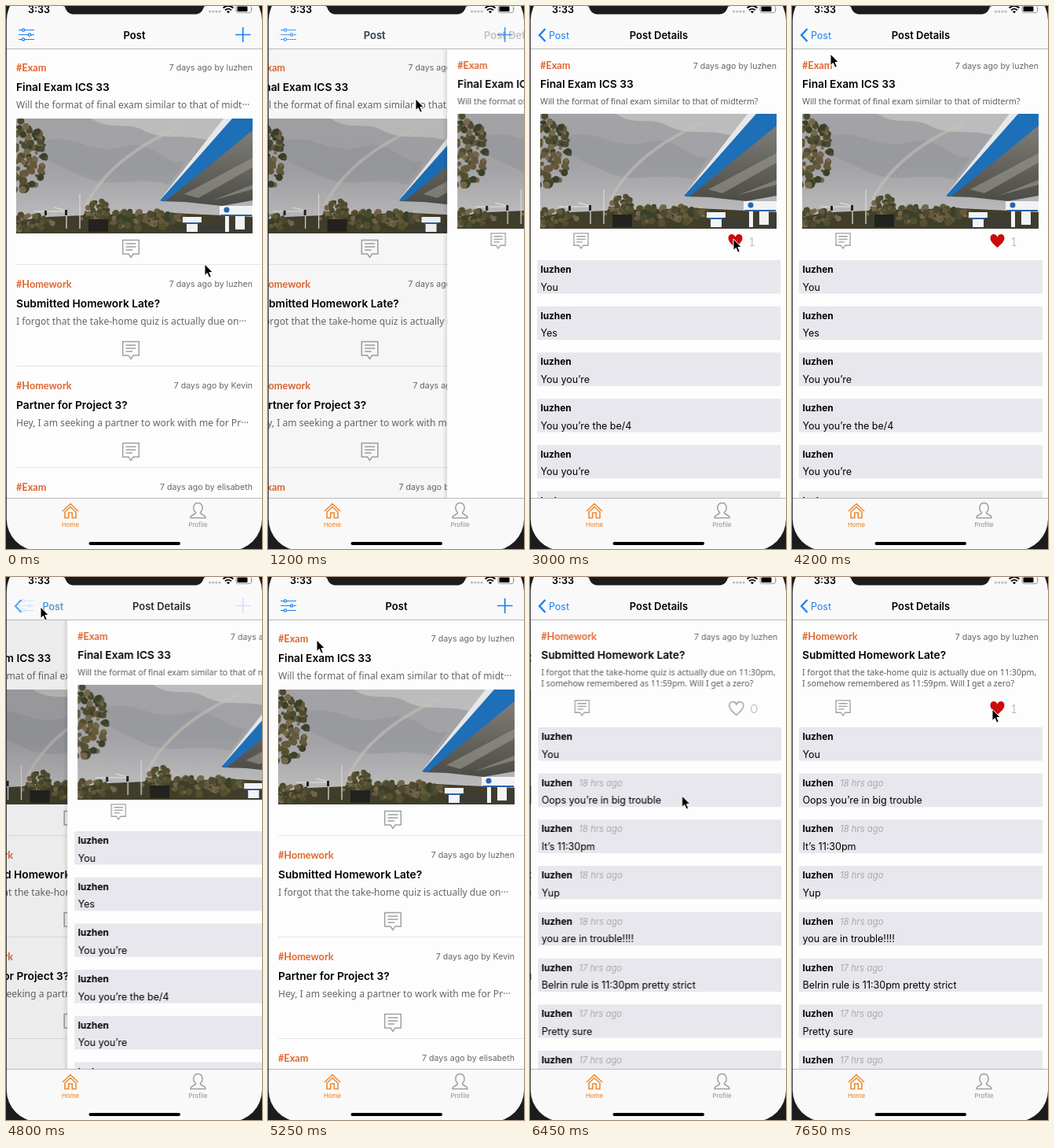
Animation, 326 px wide and 690 px high, one loop 8 s. Source, as an HTML page:

```html
<!DOCTYPE html>
<html lang="en">
<head>
<meta charset="utf-8">
<title>Class forum</title>
<style>
@property --page { syntax: "<number>"; inherits: true; initial-value: 0; }
@property --bar { syntax: "<number>"; inherits: true; initial-value: 0; }
html, body { margin: 0; width: 100%; height: 100%; overflow: hidden; background: #1c1c1c; }
svg { display: block; font-family: Inter, sans-serif; }
#stage { width: 326px; height: 690px; animation: navigate 8s -30ms step-end infinite; }

.tag { font: 700 12.7px Lato, sans-serif; fill: #e0662f; }
.meta { font-size: 10.6px; fill: #666; text-anchor: end; }
.title { font-size: 13.75px; font-weight: 600; }
.excerpt { font: 12.1px "Noto Sans", sans-serif; fill: #666; }
.body { font: 10.64px "Noto Sans", sans-serif; fill: #5c5c5c; }
.name { font-size: 11.8px; font-weight: 700; }
.ago { font-size: 11.3px; font-style: italic; fill: #aaa; }
.reply { font-size: 12.5px; }
.count { font: 300 15.5px Lato, sans-serif; fill: #999; }
.nav { font-size: 13px; font-weight: 600; text-anchor: middle; }
.back { font-size: 12.5px; font-weight: 400; fill: #1c80f5; }
.tab { font-size: 7.8px; font-weight: 500; text-anchor: middle; }
.line { fill: none; stroke: #a0a0a0; stroke-width: 1.5; }
.blue { fill: none; stroke: #1c80f5; stroke-width: 1.2; }

#list { transform: translateX(calc(var(--page) * -98px)); }
#dim { opacity: calc(var(--page) * .09); }
#detail { transform: translateX(calc((1 - var(--page)) * 326px)); }
#shadow { opacity: calc(var(--page) * (1 - var(--page)) * 3); }
#home-title { transform: translateX(calc(var(--bar) * -126.5px)); }
#detail-title { transform: translateX(calc((1 - var(--bar)) * 190px)); opacity: var(--bar); }
.leaving { opacity: calc(1 - var(--bar)); }
.arriving { opacity: var(--bar); }
#chevron { stroke-width: 2.4; opacity: calc(var(--bar) * var(--bar)); }

#exam, #homework, .replies, .liked { animation: 8s -30ms step-end infinite; }
#exam { animation-name: exam; }
#homework { animation-name: homework; }
#exam .replies { animation-name: exam-load; }
#exam .liked { animation-name: exam-like; }
#homework .replies { animation-name: homework-load; }
#homework .liked { animation-name: homework-like; }
#cursor { animation: point 8s -30ms infinite; }

@keyframes navigate {
  0% { --page: 0; --bar: 0; }
  15% { --page: .3; --bar: .22; }
  16.875% { --page: .896; --bar: .8; }
  18.75% { --page: .989; --bar: .98; }
  20.625% { --page: .9985; --bar: 1; }
  22.5% { --page: 1; --bar: 1; }
  60% { --page: .76; --bar: .82; }
  61.875% { --page: .116; --bar: .2; }
  63.75% { --page: .013; --bar: .02; }
  65.625% { --page: 0; --bar: 0; }
  76.875% { --page: .641; --bar: .59; }
  78.75% { --page: .9575; --bar: .94; }
  80.625% { --page: .996; --bar: 1; }
  82.5%, 100% { --page: 1; --bar: 1; }
}
@keyframes exam { 0% { opacity: 1; } 70%, 100% { opacity: 0; } }
@keyframes homework { 0% { opacity: 0; } 70%, 100% { opacity: 1; } }
@keyframes exam-load { 0% { opacity: 0; } 18.75%, 100% { opacity: 1; } }
@keyframes exam-like { 0% { opacity: 0; } 37.5%, 100% { opacity: 1; } }
@keyframes homework-load { 0% { opacity: 0; } 80.625%, 100% { opacity: 1; } }
@keyframes homework-like { 0% { opacity: 0; } 95.625%, 100% { opacity: 1; } }
@keyframes point {
  0% { transform: translate(253px, 328px); animation-timing-function: steps(7); }
  13.125%, 15% { transform: translate(188px, 118px); animation-timing-function: steps(3); }
  20.625% { transform: translate(194px, 137px); animation-timing-function: steps(3); }
  26.25% { transform: translate(254px, 284px); animation-timing-function: steps(3); }
  31.875%, 39.375% { transform: translate(259px, 296px); animation-timing-function: steps(7); }
  52.5% { transform: translate(49px, 61px); animation-timing-function: steps(1); }
  54.375%, 60% { transform: translate(44px, 38px); animation-timing-function: steps(3); }
  65.625% { transform: translate(62px, 80px); animation-timing-function: steps(4); }
  73.125%, 76.875% { transform: translate(136px, 374px); animation-timing-function: steps(4); }
  84.375%, 86.25% { transform: translate(251px, 182px); animation-timing-function: steps(3); }
  91.875%, 100% { transform: translate(255px, 168px); }
}
</style>
</head>
<body>
<svg id="stage" viewBox="0 0 326 690">
  <defs>
    <linearGradient id="sky" x2="0" y2="1">
      <stop stop-color="#a3a3a6"/><stop offset=".45" stop-color="#a2a2a7"/><stop offset="1" stop-color="#c3c3c2"/>
    </linearGradient>
    <linearGradient id="roof" x2="0" y2="1">
      <stop stop-color="#83827c"/><stop offset="1" stop-color="#4c4b46"/>
    </linearGradient>
    <linearGradient id="edge">
      <stop stop-opacity="0"/><stop offset="1" stop-opacity=".18"/>
    </linearGradient>
    <clipPath id="frame"><path d="M0 0H301V146H0z"/></clipPath>
    <g id="bubble" class="line">
      <path d="M-10.3-11H10.3V6.5H3L0 11-3 6.5H-10.3z"/>
      <path d="M-6.5-6.5H6.5M-6.5-2.5H6.5M-6.5 1.5H2"/>
    </g>
    <path id="heart" d="M0 8.5C-4 5-9 1-9-3.5C-9-9.5-2-10 0-5C2-10 9-9.5 9-3.5C9 1 4 5 0 8.5z"/>
    <g id="photo" clip-path="url(#frame)">
      <path fill="url(#sky)" d="M0 0H301V146H0z"/>
      <path fill="#bcbcbc" d="M96 0H270L245 28C210 18 190 30 160 14C140 4 120 16 96 0z"/>
      <path fill="#929398" opacity=".5" d="M30 30C70 15 95 48 135 36S190 62 215 54L195 84C150 72 120 92 80 72S40 60 30 30z"/>
      <path fill="none" stroke="#c9c4b8" stroke-width="4" opacity=".55" d="M88 112C108 70 150 36 206 12"/>
      <g id="foliage"></g>
      <path fill="none" stroke="#d6d6d2" stroke-width="1.3" d="M81 96V140M64 140V117L48 113M23 118H64"/>
      <path fill="#23221f" d="M92 128H117V144H92zM62 116h3v7h-3zM36 117h3v6h-3z"/>
      <path fill="url(#roof)" d="M184 105L301 8V104L262 111 215 106z"/>
      <path fill="#9b9a91" opacity=".6" d="M214 96L301 50V62L232 101zM250 104L301 84V90z"/>
      <path fill="#1d6fb8" d="M183 104L274 0H301V15L190 105z"/>
      <path fill="#e6e8ea" d="M182 105L264 0H275z"/>
      <path fill="#3d3c34" d="M212 133H301V146H212z"/>
      <path fill="#f2f3f4" d="M212 125H236V132H212zM259 111H301V123H259zM217 132h14v12h-14zM266 123h5v21h-5zM279 123h12v18h-12z"/>
      <path fill="#2b62a8" d="M215 132h18v2h-18zM260 122h40v2h-40z"/>
      <circle cx="268" cy="116" r="3.5" fill="#2b62a8"/>
    </g>
  </defs>

  <path fill="#fdfdfd" d="M0 0H326V690H0z"/>
  <g id="list"></g>
  <path id="dim" d="M0 54H326V626H0z"/>
  <g id="detail">
    <path id="shadow" fill="url(#edge)" d="M-6 54H0V626H-6z"/>
    <path fill="#fdfdfd" d="M0 54H326V626H0z"/>
    <g id="exam"></g>
    <g id="homework"></g>
  </g>

  <path fill="#f9f9f9" d="M0 0H326V54H0zM0 626H326V690H0z"/>
  <path stroke="#b9b9b9" d="M0 54.5H326M0 625.5H326"/>
  <g class="blue leaving">
    <path d="M16 30.5H36M16 36.5H36M16 42.5H36"/>
    <g fill="#f9f9f9"><circle cx="22" cy="30.5" r="1.7"/><circle cx="30" cy="36.5" r="1.7"/><circle cx="22" cy="42.5" r="1.7"/></g>
    <path stroke-width="1.7" d="M292 36.5H311.5M301.7 27V46"/>
  </g>
  <path id="chevron" class="blue" d="M19.5 29L12 37L19.5 45"/>
  <g id="home-title" class="nav">
    <text class="leaving" x="163.5" y="41.5">Post</text>
    <text class="back arriving" x="163.5" y="41.5">Post</text>
  </g>
  <text id="detail-title" class="nav" x="164" y="41.5">Post Details</text>

  <path fill="none" stroke="#ee8a35" stroke-width="1.6" d="M72 642L82 632.5 92 642M75 643V650.5H79.7V644H84.3V650.5H89V643L82 636.5z"/>
  <text class="tab" x="82" y="662" fill="#ee8a35">Home</text>
  <path class="line" d="M241.5 643.5C237 639 238.5 631.5 244.5 631.5S252 639 247.5 643.5C247 647 254 645.5 254 650.5H235C235 645.5 242 647 241.5 643.5z"/>
  <text class="tab" x="244.5" y="662" fill="#999">Profile</text>

  <text x="28" y="9" font-size="12.5" font-weight="600">3:33</text>
  <path stroke="#bbb" stroke-width="3.2" stroke-linecap="round" stroke-dasharray="0 4.2" d="M259.5 7H273"/>
  <path d="M276.5 2.5Q283-3 289.5 2.5M279 5.3Q283 2 287 5.3" fill="none" stroke="#000" stroke-width="1.8"/>
  <path d="M280.8 7Q283 5.5 285.2 7L283 9.2z"/>
  <rect x="293" y="-1" width="19.5" height="9.5" rx="2.5" fill="none" stroke="#999"/>
  <rect x="294.5" y=".5" width="13" height="6.5" rx="1"/>
  <path fill="#999" d="M313.5 2.5q1.5 1.3 0 3z"/>
  <rect x="105.5" y="681" width="116.5" height="4" rx="2"/>

  <path fill="#1c1c1c" d="M72 0C76 0 75 3 77 5.5C79 9 82 10.5 87 10.5H240C245 10.5 248 9 250 5.5C252 3 251 0 255 0z"/>
  <path fill="#1c1c1c" fill-rule="evenodd" d="M-2-30H330V700H-2zM.8 18V652A40 40 0 0 0 40.8 692H286A40 40 0 0 0 326 652V18A40 40 0 0 0 286-22H40.8A40 40 0 0 0 .8 18z"/>
  <path id="cursor" stroke="#fff" d="M0 0V14.5L3.3 11.5 5.7 17.2 8.3 16 5.9 10.5H10.3z"/>
</svg>

<script>
const $ = id => document.getElementById(id);
const text = (kind, x, y, words) => `<text class="${kind}" x="${x}" y="${y}">${words}</text>`;
const put = (id, x, y, scale = 1) => `<use href="#${id}" transform="translate(${x} ${y}) scale(${scale})"/>`;
const author = 'luzhen';

// Trees: a tall one at the left, low ones along the horizon
let seed = 7;
const random = () => (seed = seed * 16807 % 2147483647) / 2147483647;
const leafColors = ['#4b4a32', '#66593b', '#3b4029', '#75664a', '#54502f'];
const leaves = (count, x, y, w, h, r) => Array.from({ length: count }, (_, i) => {
  const angle = random() * 2 * Math.PI, reach = Math.sqrt(random());
  return `<circle cx="${x + w * reach * Math.cos(angle)}" cy="${y + h * reach * Math.sin(angle)}"
    r="${r * (.5 + random())}" fill="${leafColors[i % 5]}"/>`;
}).join('');
$('foliage').innerHTML =
  '<path fill="#403e2b" d="M0 130L40 125 110 122 200 120 301 125V146H0z"/>' +
  leaves(150, 8, 48, 30, 46, 3.5) + leaves(60, 15, 132, 34, 10, 3) +
  leaves(100, 150, 128, 68, 11, 3.5) + leaves(40, 102, 114, 16, 10, 2.5);

const posts = [
  { tag: 'Exam', by: author, title: 'Final Exam ICS 33', excerpt: 'Will the format of final exam similar to that of midt', photo: true },
  { tag: 'Homework', by: author, title: 'Submitted Homework Late?', excerpt: 'I forgot that the take-home quiz is actually due on' },
  { tag: 'Homework', by: 'Kevin', title: 'Partner for Project 3?', excerpt: 'Hey, I am seeking a partner to work with me for Pr' },
  { tag: 'Exam', by: 'elisabeth', title: '', excerpt: '' }
];

let rowEnd = 53.5;
$('list').innerHTML = posts.map(post => {
  const y = rowEnd;
  rowEnd += post.photo ? 275 : 129;
  return text('tag', 13, y + 29, '#' + post.tag) +
    text('meta', 314, y + 28.5, `7 days ago by ${post.by}`) +
    text('title', 13, y + 54.5, post.title) +
    text('excerpt', 13, y + 76.5, post.excerpt && post.excerpt + '···') +
    (post.photo ? put('photo', 13, 143) : '') +
    put('bubble', 159, rowEnd - 20) +
    `<path stroke="#e6e6e6" d="M13 ${rowEnd}H326"/>`;
}).join('');

function detail(post, lines, actionsY, replies) {
  const boxes = replies.map(([words, ago = ''], i) => {
    const y = actionsY + 24.5 + i * 58.7;
    return `<rect x="9" y="${y}" width="310" height="42.5" fill="#e8e7ed"/>` +
      text('name', 13.5, y + 16, author) +
      text('ago', 61, y + 16, ago && ago + ' hrs ago') +
      text('reply', 13.5, y + 38.5, words);
  }).join('');
  return text('tag', 13, 79.5, '#' + post.tag) +
    text('meta', 314, 80, `7 days ago by ${post.by}`) +
    text('title', 13, 104, post.title) +
    lines.map((line, i) => text('body', 13, 125 + i * 14, line)).join('') +
    (post.photo ? put('photo', 13, 137) : '') +
    put('bubble', 65, actionsY, .88) +
    `<g class="line">${put('heart', 261.5, actionsY + .5)}</g>` + text('count', 279.5, actionsY + 6, 0) +
    `<g class="liked"><path fill="#fdfdfd" d="M250 ${actionsY - 11}h42v22h-42z"/>
      <g fill="#cc0a0a">${put('heart', 261.5, actionsY)}</g>${text('count', 278, actionsY + 6, 1)}</g>` +
    `<g class="replies">${boxes}</g>`;
}

$('exam').innerHTML = detail(posts[0],
  ['Will the format of final exam similar to that of midterm?'], 298.5,
  [['You'], ['Yes'], ['You you’re'], ['You you’re the be/4'], ['You you’re'], ['']]);

$('homework').innerHTML = detail(posts[1],
  ['I forgot that the take-home quiz is actually due on 11:30pm,', 'I somehow remembered as 11:59pm. Will I get a zero?'], 166.5,
  [['You'], ['Oops you’re in big trouble', 18], ['It’s 11:30pm', 18], ['Yup', 18], ['you are in trouble!!!!', 18],
    ['Belrin rule is 11:30pm pretty strict', 17], ['Pretty sure', 17], ['', 17]]);
</script>
</body>
</html>
```
